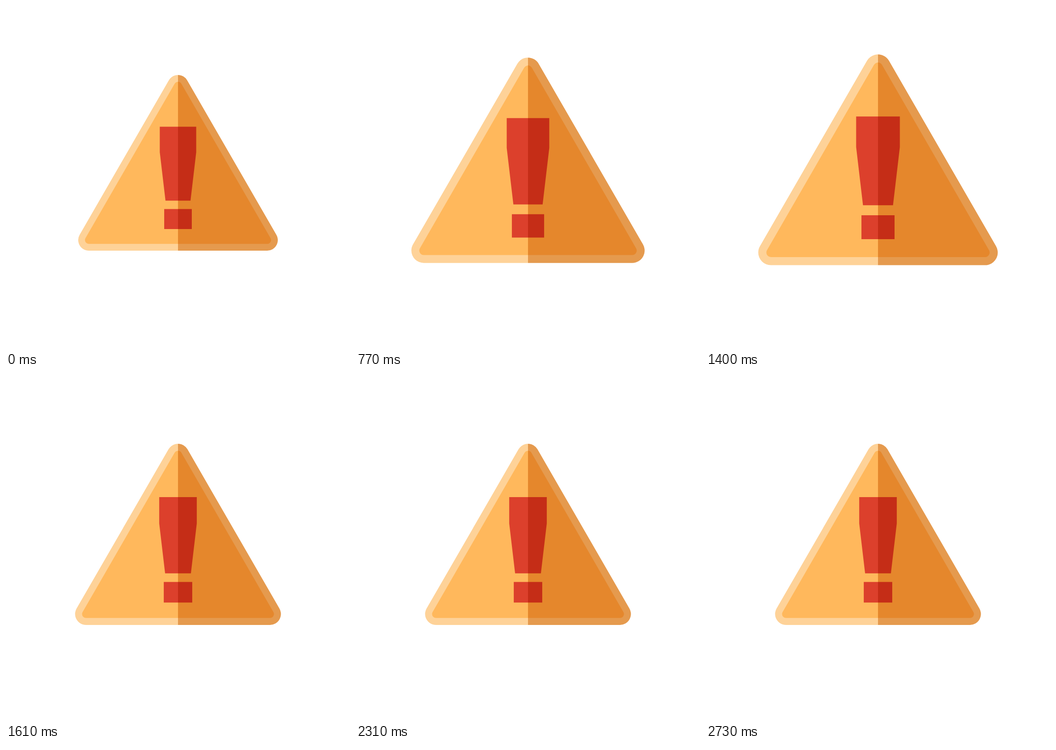
These frames come from a looping animation (748x748 px, 2.8 s). An HTML page:

```html
<!DOCTYPE html>
<html lang="en">
<head>
<meta charset="utf-8">
<title>Pulsing warning sign</title>
<style>
  html, body { margin: 0; width: 100%; height: 100%; overflow: hidden; background: #fff; }
  svg { display: block; width: 100vw; height: 100vh; }
  .light { --rim: #fed298; --face: #ffb85c; --mark: #dc402c; }
  .dark { --rim: #e59a4e; --face: #e5872c; --mark: #c52d17; }
  .rim, .face { stroke-linejoin: round; }
  .rim { fill: var(--rim); stroke: var(--rim); stroke-width: 46px; }
  .face { fill: var(--face); stroke: var(--face); stroke-width: 16.6px; }
  .mark { fill: var(--mark); }
</style>
</head>
<body>
<svg viewBox="-374 -374 748 748">
  <defs>
    <clipPath id="left"><rect x="-374" y="-374" width="374" height="748"/></clipPath>
    <clipPath id="right"><rect y="-374" width="374" height="748"/></clipPath>
    <g id="sign">
      <path class="rim" d="M0-201 194 135H-194Z"/>
      <path class="face" d="M0-201 194 135H-194Z"/>
      <path class="mark" d="M-39.6-111.5H39.6V-56L27.2 49.3H-27.2L-39.6-56Z M-30 67.4H30V110.9H-30Z"/>
    </g>
  </defs>
  <g id="pulse">
    <g class="light" clip-path="url(#left)"><use href="#sign"/></g>
    <g class="dark" clip-path="url(#right)"><use href="#sign"/></g>
  </g>
</svg>
<script>
  const STEP = 70;            // ms each pose is held
  const STEPS_PER_PULSE = 8;
  const GROWTH = 0.2;
  const pulse = document.getElementById('pulse');
  const smoothstep = x => x * x * (3 - 2 * x);

  function draw() {
    const step = Math.floor(performance.now() / STEP) % STEPS_PER_PULSE;
    const phase = 1 - Math.abs(1 - 2 * step / STEPS_PER_PULSE);
    pulse.setAttribute('transform', `scale(${1 + GROWTH * smoothstep(phase)})`);
    requestAnimationFrame(draw);
  }
  draw();
</script>
</body>
</html>
```
